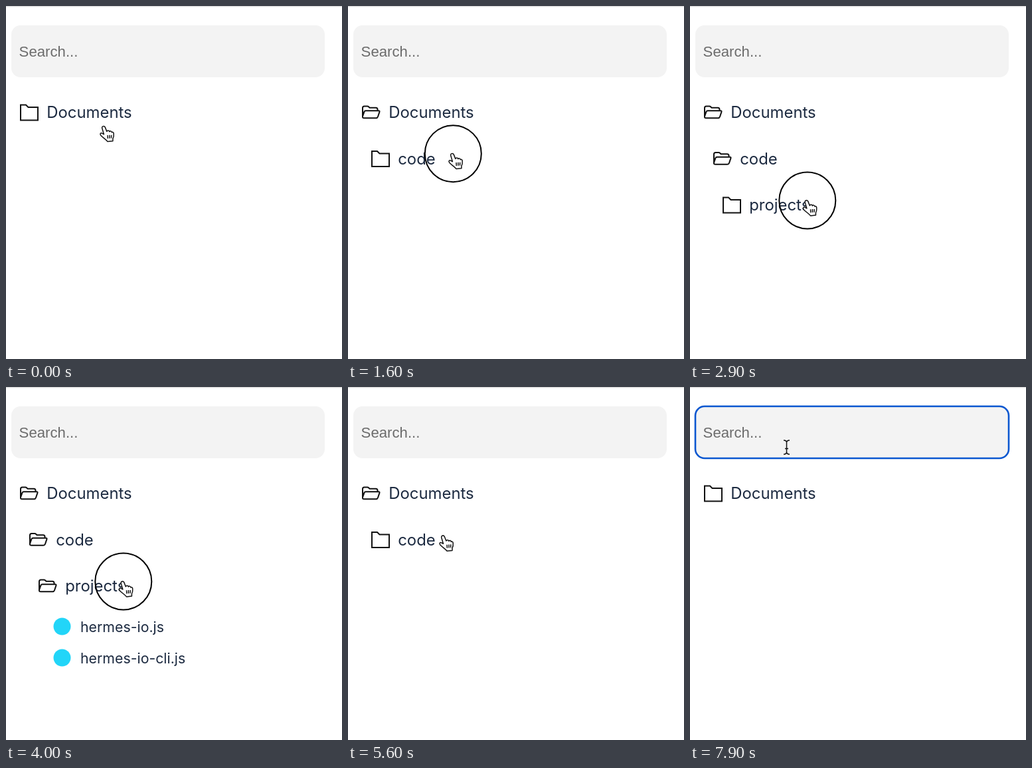
These frames come from a looping animation (506 by 530 pixels, 8 s). An HTML page:

```html
<!DOCTYPE html>
<html>
<head>
<meta charset="utf-8">
<style>
  html, body { margin: 0; width: 506px; height: 530px; overflow: hidden; background: #fff; }
  svg { display: block; }
  text { font-family: Inter, sans-serif; font-size: 23.9px; fill: #1c2a40; }
  .file text { font-size: 21.3px; }
  .placeholder { font: 22.2px "Liberation Sans", Arial, sans-serif; fill: #6c6c6c; }
  .icon { fill: none; stroke: #111; stroke-width: 2; }
  .cursor { fill: #fff; stroke: #111; stroke-width: 1.5; stroke-linejoin: round; }
</style>
</head>
<body>
<svg width="506" height="530" viewBox="0 0 506 530">
  <defs>
    <path id="closed" d="M2 3H10L13.5 6.5H28V26H2Z"/>
    <path id="open" stroke-linejoin="round" d="M2 20.5V7.5Q2 5 4.5 5H9.3Q10.3 5 11 5.7L12.6 7.3H22Q24.5 7.3 24.5 9.8V11.7M4.5 22.8Q1.2 22.8 2.2 19.8L4.4 13.4Q5 11.7 6.8 11.7H25.9Q28 11.7 27.4 13.6L25 20.8Q24.3 22.8 22.2 22.8Z"/>
  </defs>
  <rect width="506" height="1.3" fill="#d9d9d9"/>
  <rect id="field" x="8" y="29" width="472" height="78" rx="14" fill="#f3f3f3"/>
  <text class="placeholder" x="19.6" y="76">Search...</text>
  <rect id="caret" x="20.5" y="57" width="1.5" height="22"/>
  <g id="tree"></g>
  <circle id="ring" r="42.5" fill="none" stroke="#000" stroke-width="2"/>
  <g id="pointer" class="cursor">
    <g id="hand">
      <path d="M-2.2 2.8C-3.4 -.4 1 -1.9 2.3 1.1L4.8 7.4C5.6 5.4 8.5 5.6 8.8 7.7C9.8 6 12.2 6.8 12.3 8.7C13.5 7.7 15.1 8.7 15.2 10.6C15.5 13.4 15.1 16 13.9 18.2V21.8L6 22.6C3.6 19.4 -.9 16.9 -4 13.6C-6.3 10.8 -4.4 9 -2.2 10.1L.4 11.6Z"/>
      <path d="M6 13L6.3 18M8.9 12.8V17.8M11.7 12.7L11.5 17.5"/>
    </g>
    <path id="arrow" d="M0 0V17L4 13.5L7 20L10 18.7L7 12.4H12Z"/>
    <path id="beam" fill="none" d="M-4.5 -10.5Q0 -10.5 0 -7Q0 -10.5 4.5 -10.5M0 -7V7M-4.5 10.5Q0 10.5 0 7Q0 10.5 4.5 10.5M-2.5 2H2.5"/>
  </g>
</svg>
<script>
const $ = id => document.getElementById(id);
const LOOP = 8000, STEP = 100;

// Times at which each row is visible and each folder is open.
const docsOpen = [600, 6300], codeOpen = [1800, 5400], projectsOpen = [3300, 4300];
const folders = [
  { name: 'Documents', shown: [0, LOOP], open: docsOpen },
  { name: 'code', shown: docsOpen, open: codeOpen },
  { name: 'projects', shown: codeOpen, open: projectsOpen },
];
const files = ['hermes-io.js', 'hermes-io-cli.js'];

// Pointer moves: start, end, destination.
const moves = [
  [0, 200, 142, 173], [700, 1400, 157, 222], [2100, 2800, 175.5, 292.3],
  [4400, 4700, 144, 229], [5500, 6000, 135, 178], [6600, 7200, 145.5, 90.5],
];
const clicks = [300, 1500, 2900, 4000, 5100, 6100];

$('tree').innerHTML = folders.map(({ name }, level) => `
  <g transform="translate(${20 + 14 * level} ${145.5 + 69.5 * level})">
    <use class="icon" href="#closed"/>
    <text x="41.2" y="22.5">${name}</text>
  </g>`).join('') + files.map((name, i) => `
  <g class="file" transform="translate(0 ${360 + 47 * i})">
    <circle cx="84.5" cy="-.5" r="13" fill="#22d5f8"/>
    <text x="112" y="7.6">${name}</text>
  </g>`).join('');
const rows = [...$('tree').children];

const within = (t, [from, to]) => t >= from && t < to;
const show = (el, visible) => el.setAttribute('visibility', visible ? 'visible' : 'hidden');
const ease = p => p * p * (3 - 2 * p);

function pointerAt(t) {
  let x = 147, y = 181;
  for (const [from, to, toX, toY] of moves) {
    const k = ease(Math.min(1, Math.max(0, (t - from) / (to - from))));
    x += (toX - x) * k;
    y += (toY - y) * k;
  }
  return [x, y];
}

function draw(t) {
  rows.forEach((row, i) => {
    const folder = folders[i];
    show(row, within(t, folder ? folder.shown : projectsOpen));
    if (folder) row.firstElementChild.setAttribute('href', within(t, folder.open) ? '#open' : '#closed');
  });

  const [x, y] = pointerAt(t);
  $('pointer').setAttribute('transform', `translate(${x} ${y})`);
  show($('hand'), y > 132);
  show($('arrow'), y > 107 && y <= 132);
  show($('beam'), y <= 107);

  $('ring').setAttribute('transform', `translate(${x + 1.3} ${y - .3})`);
  show($('ring'), clicks.some(c => within(t, [c, c + 200])));

  const focused = t >= 7400;
  $('field').setAttribute('stroke', focused ? '#0b57d0' : 'none');
  $('field').setAttribute('stroke-width', 2.6);
  show($('caret'), focused && t < 7900);
}

function tick() {
  draw(Math.floor(performance.now() % LOOP / STEP) * STEP);
  requestAnimationFrame(tick);
}
tick();
</script>
</body>
</html>
```
